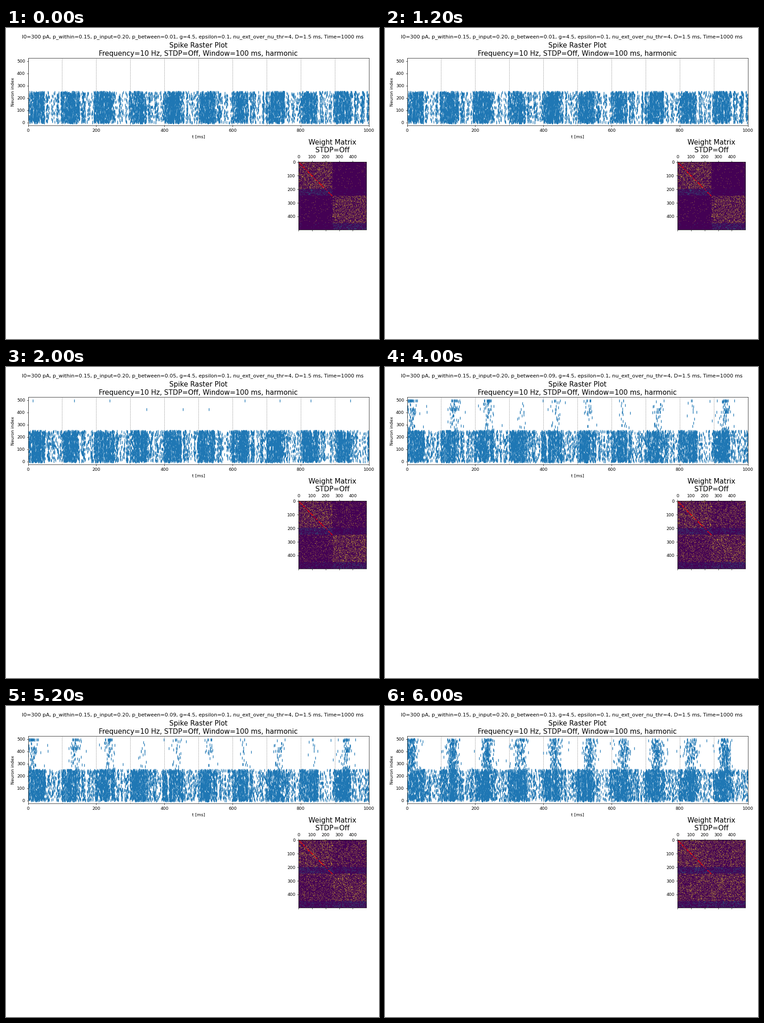
Animation, 820 px wide and 683 px high, one loop 8000 ms. Source, as a matplotlib script:

```python
import numpy as np
import matplotlib.pyplot as plt
from matplotlib.animation import FuncAnimation

W, H = 820, 683
DPI = W / 12
N, T_END, PERIOD = 500, 1000, 100
HALF = N // 2
CELLS = 218  # visible resolution of the weight matrix
P_BETWEEN = [0.01, 0.05, 0.09, 0.13]

# Spikes per burst of the second population: floor + spread * gain of the cycle
BURST_SIZE = [(0, 0), (1, 0), (3, 85), (130, 120)]
CYCLE_GAIN = [1, 0.85, 0.75, 0.15, 0.35, 0.3, 0.2, 0.45, 0.1, 1]
LEADERS = [495, 495, 424, 404]  # neurons that fire first
LEADER_SHARE = [0, 1, 0.3, 0.1]


def driven_spikes(rng, scene):
    """First population: harmonic drive, broken up by stripes and quiet gaps."""
    t = np.arange(T_END)
    kernel = np.hanning(9)
    kernel /= np.sqrt((kernel**2).sum())
    stripes = np.convolve(rng.normal(size=T_END), kernel, "same")
    rate = (11.5 + 7 * np.sin(2 * np.pi * t / PERIOD)) * np.exp(0.35 * stripes)
    for start in range(0, T_END, PERIOD):
        for gap in start + np.array([54, 68, 82, 92]) + rng.normal(0, 3, 4):
            rate *= 1 - (0.95 - 0.1 * scene) * np.exp(-((t - gap) / 3) ** 2)
    counts = rng.poisson(np.clip(rate, 0, 22))
    times = np.repeat(t, counts) + rng.random(counts.sum())
    return times, rng.integers(0, HALF, len(times))


def burst_spikes(rng, scene):
    """Second population: one burst per cycle, with a few stragglers around it."""
    floor, spread = BURST_SIZE[scene]
    counts = [round(floor + spread * gain) for gain in CYCLE_GAIN]
    centers = 35 + PERIOD * np.arange(len(counts)) + rng.normal(0, 2, len(counts))
    centers[0] = 12
    centers = np.repeat(centers, counts)
    size = len(centers)
    width = np.where(rng.random(size) < 0.15, 18, 4 + 1.5 * scene)
    times = np.abs(rng.normal(centers, width))
    cells = np.where(rng.random(size) < LEADER_SHARE[scene],
                     rng.choice(LEADERS, size), rng.integers(HALF, N, size))
    return times, cells


def make_raster(scene):
    rng = np.random.default_rng(40 + scene)
    parts = driven_spikes(rng, scene), burst_spikes(rng, scene)
    return np.vstack([np.column_stack(part) for part in parts])


def make_weights(scene):
    rng = np.random.default_rng(7 + scene)
    index = np.arange(CELLS) * N / CELLS
    group = index // HALF
    same = group[:, None] == group[None, :]
    linked = rng.random((CELLS, CELLS)) < np.where(same, 0.15, P_BETWEEN[scene])
    strength = np.where(index % HALF < 200, 1.0, 0.45)
    return linked * strength[:, None]


def add_axes(left, top, width, height):
    return fig.add_axes([left / W, 1 - (top + height) / H, width / W, height / H])


scenes = range(len(P_BETWEEN))
rasters = [make_raster(i) for i in scenes]
weights = [make_weights(i) for i in scenes]

plt.rcParams["font.family"] = "DejaVu Sans"
fig = plt.figure(figsize=((W + 0.001) / DPI, (H + 0.001) / DPI), dpi=DPI, facecolor="white")
heading = fig.suptitle("", fontsize=12)

ax = add_axes(48.5, 66.5, 749, 148)
for t in range(0, T_END, PERIOD):
    ax.axvline(t, color="gray", linestyle="--", linewidth=0.7, zorder=0)
spikes = ax.scatter([], [], s=36, marker="|", color="C0", linewidths=1.5)
ax.set(xlim=(0, T_END), ylim=(-24.95, 523.95),
       xticks=range(0, 1001, 200), yticks=range(0, 501, 100),
       xlabel="t [ms]", ylabel="Neuron index")
ax.set_title("Spike Raster Plot\nFrequency=10 Hz, STDP=Off, Window=100 ms, harmonic", fontsize=16)

mx = add_axes(643, 294.5, 149, 149)
matrix = mx.matshow(weights[0], cmap="viridis", vmin=0, vmax=1, aspect="auto",
                    extent=(-0.5, N - 0.5, N - 0.5, -0.5),
                    interpolation="hanning", interpolation_stage="rgba")
inputs = np.random.default_rng(3).choice(HALF, 50, replace=False)
mx.scatter(inputs, inputs, s=4, color="red", linewidths=0)
mx.set(xlim=(-0.5, N - 0.5), ylim=(N - 0.5, -0.5),
       xticks=range(0, N, 100), yticks=range(0, N, 100))
mx.set_title("Weight Matrix\nSTDP=Off", fontsize=16)


def update(scene):
    heading.set_text(
        f"I0=300 pA, p_within=0.15, p_input=0.20, p_between={P_BETWEEN[scene]:.2f}, "
        "g=4.5, epsilon=0.1, nu_ext_over_nu_thr=4, D=1.5 ms, Time=1000 ms")
    spikes.set_offsets(rasters[scene])
    matrix.set_data(weights[scene])
    return heading, spikes, matrix


anim = FuncAnimation(fig, update, frames=len(scenes), interval=2000, repeat=True, blit=False)
plt.show()
```
